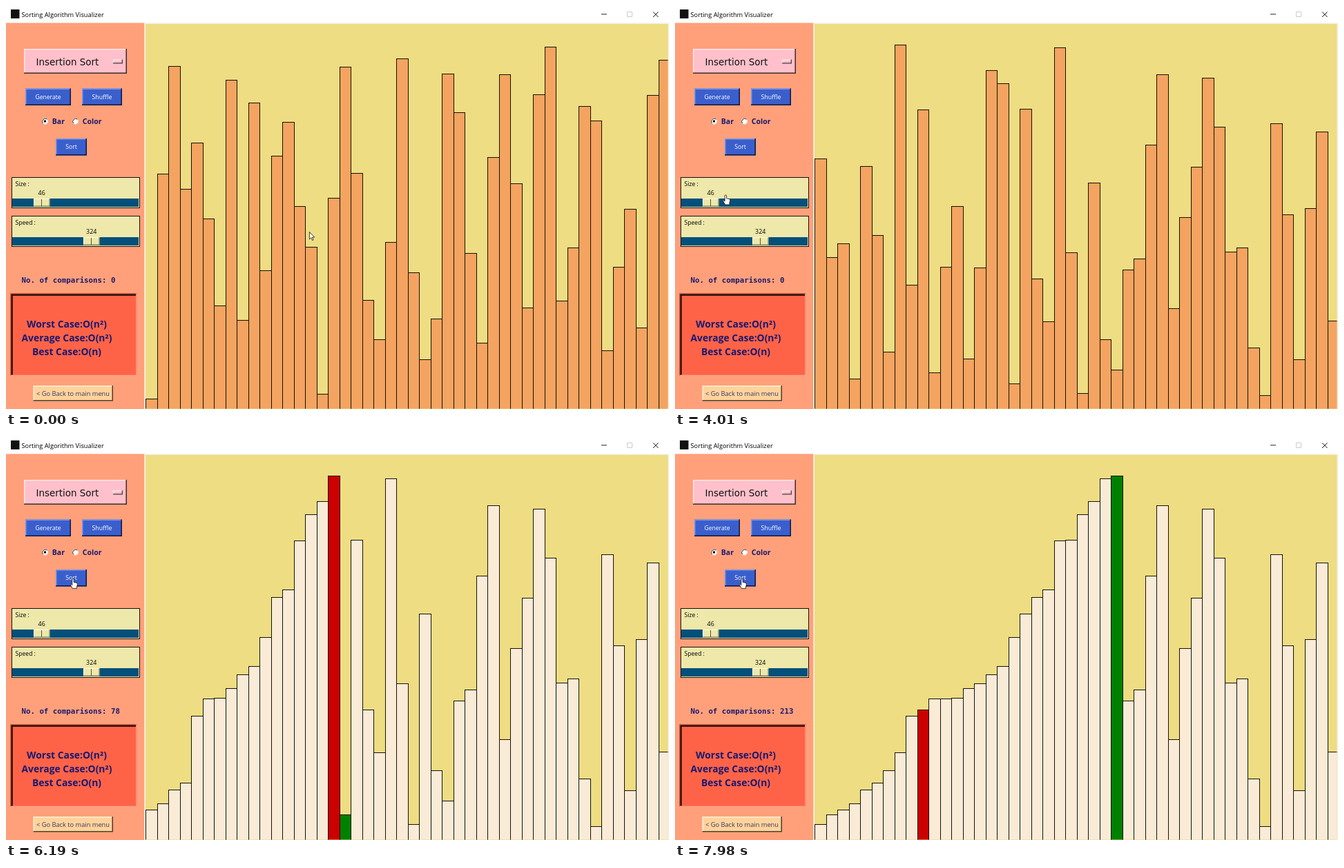
An HTML page that plays this animation: 960 by 584 pixels, repeating every 8 s.

```html
<!DOCTYPE html>
<html lang="en">
<head>
<meta charset="utf-8">
<title>Sorting Algorithm Visualizer</title>
<style>
  html, body { margin: 0; width: 100%; height: 100%; overflow: hidden; background: #fff; }
  svg { display: block; width: 960px; height: 584px; }
  text { font-family: "Open Sans", "Noto Sans", sans-serif; white-space: pre; }
  .menu { font: 13.45px "DejaVu Sans", sans-serif; }
  .mono { font: bold 10.75px "DejaVu Sans Mono", monospace; }
  .bold { font-weight: 700; }
  .mid { text-anchor: middle; }
</style>
</head>
<body>
<svg id="stage" viewBox="0 0 960 584"></svg>
<script>
const LOOP = 8000, NEW_SET = 2930, SORT = 5260, PRESS = 230, FRAME = 46;
const NAVY = '#191970', BLUE = '#3a5fcd', BLUE_LIGHT = '#7b97ea', BLUE_DARK = '#0c1640';

// The two data sets: top edge of each bar
const first = [569, 243, 87, 265, 198, 308, 434, 107, 455, 140, 383, 217, 168, 290, 349, 562,
  278, 88, 242, 426, 483, 342, 76, 386, 512, 453, 98, 154, 358, 488, 219, 99,
  257, 437, 128, 59, 427, 350, 145, 166, 499, 378, 294, 466, 129, 78];
const second = [221, 364, 344, 540, 232, 332, 501, 56, 404, 150, 531, 378, 290, 511, 379, 93,
  112, 547, 149, 395, 457, 60, 357, 561, 256, 483, 527, 382, 366, 201, 99, 438,
  306, 233, 104, 175, 356, 350, 495, 564, 170, 302, 512, 293, 182, 456];

// Sorting progress: [drawn frame, step]
const pace = [[12, 49.9], [28, 108.1], [43, 159.9], [59, 214.1]];

// Pointer moves; bend is the sideways bulge of the path
const home = { x: 439, y: 327 };
const moves = [
  { from: 930, to: 1220, n: 7, x: 303, y: 212, bend: 0 },
  { from: 1500, to: 1940, n: 10, x: 163, y: 156, bend: 0 },
  { from: 2160, to: 2700, n: 11, x: 70, y: 137, bend: 0 },
  { from: 3310, to: 4110, n: 18, x: 73, y: 274, bend: 24 },
  { from: 4160, to: 4900, n: 17, x: 97, y: 205, bend: -18 }
];

const stage = document.getElementById('stage');
const handAreas = [];

function add(tag, attrs, parent = stage) {
  const el = document.createElementNS('http://www.w3.org/2000/svg', tag);
  for (const k in attrs) el.setAttribute(k, attrs[k]);
  return parent.appendChild(el);
}
function box(x, y, width, height, fill, more = {}) {
  return add('rect', { x, y, width, height, fill, ...more });
}
function label(str, x, y, size, fill, cls = '') {
  const el = add('text', { x, y, fill, class: cls, style: size ? `font-size:${size}px` : '' });
  el.textContent = str;
  return el;
}
function line(d, stroke, width = 1) {
  return add('path', { d, stroke, 'stroke-width': width, fill: 'none' });
}
// Bevelled box; returns its two edge paths
function bevel(x, y, w, h, fill, light, dark, t = 1.5) {
  box(x, y, w, h, fill);
  const o = t / 2, r = x + w - o, b = y + h - o;
  return [
    line(`M${x + o} ${y + h}V${y + o}H${x + w}`, light, t),
    line(`M${x} ${b}H${r}V${y}`, dark, t)
  ];
}
// Returns a function that sets the pressed look
function button(str, x, y, w, h, size) {
  const [near, far] = bevel(x, y, w, h, BLUE, BLUE_LIGHT, BLUE_DARK);
  label(str, x + w / 2, y + h / 2 + 3.2, size, '#fff', 'mid');
  handAreas.push([x, y, x + w - 1, y + h - 1.5]);
  return on => {
    near.setAttribute('stroke', on ? BLUE_DARK : BLUE_LIGHT);
    far.setAttribute('stroke', on ? BLUE_LIGHT : BLUE_DARK);
  };
}
function slider(name, value, y, knob) {
  box(8.5, y + .5, 185, 44, '#eee8aa', { stroke: '#111' });
  label(name, 13.5, y + 12.6, 8.6, '#000');
  label(value, knob + 11.7, y + 26, 8.9, '#000', 'mid');
  box(9, y + 31, 183, 12, '#03507b');
  bevel(knob, y + 31, 23.5, 11.5, '#eee8aa', '#fdfbe6', '#77744f', 1);
  line(`M${knob + 11.5} ${y + 32}v10`, '#55533a');
  handAreas.push([8, y, 194, y + 45]);
}
function radio(x, name, on) {
  add('circle', { cx: x, cy: 167, r: 4.3, fill: '#fff', stroke: '#f5d0c0', 'stroke-width': .8 });
  line(`M${x - 3} 170A4.3 4.3 0 0 1 ${x + 3} 164`, '#333');
  if (on) add('circle', { cx: x, cy: 167, r: 1.7, fill: '#000' });
  label(name, x + 10.3, 170.8, 10.5, NAVY, 'bold');
}

// Window frame
box(0, 0, 960, 584, '#fff');
box(7, 5, 12.5, 13, '#111');
label('Sorting Algorithm Visualizer', 22.5, 15.6, 9.25, '#000');
line('M862 11.9h8', '#222');
line('M899.5 8.5h7v7h-7z', '#ccc');
line('M937 8.5l7.5 7.5M944.5 8.5l-7.5 7.5', '#111');

// Side panel
box(0, 24.5, 200.5, 560, '#ffa07a');
bevel(26, 62, 149, 36, '#ffc0cb', '#ffe6ea', '#3c2b2e');
label('Insertion Sort', 43.5, 86, 0, '#111', 'menu');
bevel(155, 77.5, 14, 6, '#ffc0cb', '#ffeef0', '#4d3a3d', 1.3);
const pressGenerate = button('Generate', 28, 119.5, 66, 24.5, 8.6);
button('Shuffle', 110, 119.5, 58, 24.5, 8.9);
radio(56.5, 'Bar', true);
radio(100.5, 'Color', false);
const pressSort = button('Sort', 72, 192, 45, 24.5, 8.7);
slider('Size :', '46', 248, 40);
slider('Speed :', '324', 304, 112);
const counter = label('', 22.5, 401, 0, NAVY, 'mono');

bevel(6.5, 416.5, 183, 119.5, '#ff6347', '#8f3a2b', '#ffa492', 1.2);
line('M8.7 534.5V418.7H188', '#160806', 2);
['Worst Case:O(n²)', 'Average Case:O(n²)', 'Best Case:O(n)'].forEach((str, i) =>
  label(str, 88, 466 + 20 * i, 13.9, NAVY, 'bold mid'));

bevel(39.5, 550, 115.5, 22.5, '#ffd39b', '#ffedd6', '#4a3d2d');
label('< Go Back to main menu', 44, 565, 9.27, '#34346a');

// Chart
box(200.5, 24.5, 759.5, 560, '#f2f0e4');
box(202, 26, 756.5, 558, '#eedd82');
const clip = add('clipPath', { id: 'chart' });
add('rect', { x: 201, y: 26, width: 757.5, height: 557.5 }, clip);
const chart = add('g', { 'clip-path': 'url(#chart)', stroke: '#15110c' });
const edge = i => Math.round(202 + i * 16.51) + .5;
const bars = first.map((_, i) => add('rect', { x: edge(i), width: edge(i + 1) - edge(i) }, chart));

// Pointers
const ink = { fill: '#fff', stroke: '#111', 'stroke-width': .8, 'stroke-linejoin': 'round' };
const arrow = add('path', { d: 'M.4.5V11L2.8 8.7 4.6 12.6 6.1 11.9 4.4 8.1H7.6Z', ...ink });
const hand = add('path', {
  d: 'M-1.2 1.6Q-1.2.4 0 .4T1.2 1.6V5.4L5 6.2Q6.7 6.7 6.5 8.5L5.6 12V14.6H-.6L-3.5 9.6Q-4 8.2-2.9 8L-1.2 9.6Z', ...ink
});

// Every shift of an insertion sort, as { bars, i, j }
function sortSteps(list, limit) {
  const a = [...list], steps = [];
  for (let i = 1; i < a.length && steps.length < limit; i++) {
    const key = a[i];
    let j = i - 1;
    steps.push({ bars: [...a], i, j });
    while (j >= 0 && a[j] < key) {
      a[j + 1] = a[j];
      j--;
      steps.push({ bars: [...a], i, j });
    }
    a[j + 1] = key;
  }
  return steps;
}
const steps = sortSteps(second, 230);

function progress(frame) {
  let n = 1;
  while (n < pace.length - 1 && pace[n][0] < frame) n++;
  const [f0, s0] = pace[n - 1], [f1, s1] = pace[n];
  return s0 + (s1 - s0) * (frame - f0) / (f1 - f0);
}

function pointerAt(t) {
  let pos = home;
  for (const m of moves) {
    if (t < m.from) break;
    const step = Math.floor((t - m.from) / (m.to - m.from) * (m.n - 1)) + 1;
    const e = 1 - (1 - Math.min(1, step / m.n)) ** 3;
    pos = {
      x: pos.x + (m.x - pos.x) * e + m.bend * Math.sin(Math.PI * e),
      y: pos.y + (m.y - pos.y) * e
    };
  }
  return pos;
}

function drawBars(tops, color) {
  bars.forEach((bar, i) => {
    bar.setAttribute('y', tops[i] + .5);
    bar.setAttribute('height', 590 - tops[i]);
    bar.setAttribute('fill', color(i));
  });
}

function render(t) {
  let count = 0;
  if (t < SORT) {
    drawBars(t < NEW_SET ? first : second, () => '#f4a460');
  } else {
    const p = progress(Math.floor((t - SORT) / FRAME));
    const s = steps[Math.floor(p)];
    count = Math.floor(p - .5);
    drawBars(s.bars, k => k === s.j ? '#cc0000' : k === s.i ? '#008000' : '#faebd7');
  }
  counter.textContent = 'No. of comparisons: ' + count;
  pressGenerate(t >= NEW_SET - PRESS && t < NEW_SET);
  pressSort(t >= SORT - PRESS && t < SORT);

  const { x, y } = pointerAt(t);
  const over = handAreas.some(([l, top, r, b]) => x >= l && x <= r && y >= top && y <= b);
  for (const el of [arrow, hand]) el.setAttribute('transform', `translate(${x} ${y})`);
  arrow.setAttribute('visibility', over ? 'hidden' : 'visible');
  hand.setAttribute('visibility', over ? 'visible' : 'hidden');
}

const begin = performance.now();
function tick() {
  render((performance.now() - begin) % LOOP);
  requestAnimationFrame(tick);
}
tick();
</script>
</body>
</html>
```
